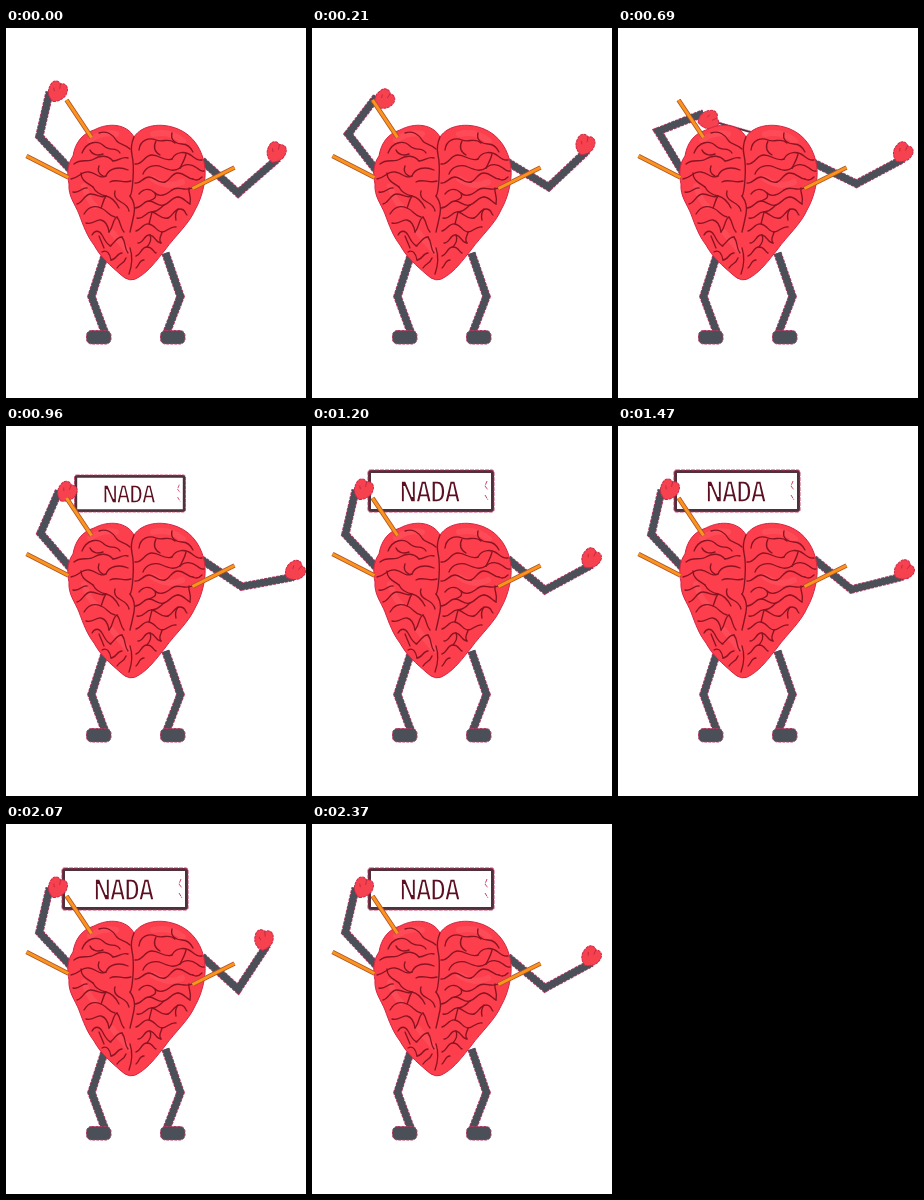
These frames come from a looping animation (300 px wide and 370 px high, 2400 ms). An HTML page:

```html
<!DOCTYPE html>
<html lang="es">
<head>
<meta charset="utf-8">
<title>Nada</title>
<style>
html, body { margin: 0; width: 100%; height: 100%; overflow: hidden; background: #fff; }
svg { display: block; width: 300px; height: 370px; }
path { fill: none; stroke-linecap: butt; stroke-linejoin: miter; }
.edge { stroke: #c43a68; stroke-width: 8.4; stroke-dasharray: 3 1; }
.limb { stroke: #4b4f58; stroke-width: 7; }
.foot { fill: #4b4f58; stroke: #b03a60; stroke-width: 1; stroke-dasharray: 3 1; }
.fist { fill: #f6414f; stroke: #cf2848; stroke-width: 1; stroke-dasharray: 3 .7; }
.crease { stroke: #c4283f; stroke-width: .9; }
.brain { fill: #fc3e4d; stroke: #d22743; stroke-width: 1; stroke-linejoin: round; }
.shade { stroke: #ff5b66; stroke-width: 6; stroke-linecap: round; opacity: .45; }
.fold { stroke: #8a1422; stroke-width: 1.35; stroke-linecap: round; stroke-linejoin: round; }
.rim { stroke: #b0532a; stroke-width: 4.6; }
.stick { stroke: #fa941d; stroke-width: 3; }
.board { fill: #fff; stroke: #4d323e; stroke-width: 3; }
.trim { fill: none; stroke: #c62d58; stroke-width: .9; stroke-dasharray: 4 1; }
/* The white stroke thins the bold lettering */
text {
  font: 700 29px "Open Sans Condensed", "Open Sans", sans-serif;
  font-stretch: 75%; letter-spacing: -1.5px; text-anchor: middle;
  fill: #5c0f20; stroke: #fff; stroke-width: 1.7;
}
</style>
</head>
<body>
<svg viewBox="0 0 300 370">
  <g id="sign">
    <rect class="board" x="-61.5" y="-19.5" width="123" height="39" rx="1.5"/>
    <rect class="trim" x="-63" y="-21" width="126" height="42" rx="2"/>
    <path class="trim" d="M56 -10l-2 5 3 4M54 4l3 5"/>
    <text x="-2" y="11">NADA</text>
  </g>
  <g id="legs"></g>
  <g id="arms"></g>
  <g id="body"></g>
  <g id="sticks"></g>
</svg>
<script>
const LOOP = 2400, STEP = 30;
const get = id => document.getElementById(id);

function add(parent, tag, attrs) {
  const el = document.createElementNS("http://www.w3.org/2000/svg", tag);
  for (const name in attrs) el.setAttribute(name, attrs[name]);
  return parent.appendChild(el);
}
const line = (parent, cls, d) => add(parent, "path", { class: cls, d });

// Legs
for (const [d, footX] of [
  ["M99.500 225L85.500 268.500L99 305", 80.500],
  ["M159.500 225L174.500 268.500L160.500 305", 154.500]
]) {
  const legs = get("legs");
  line(legs, "edge", d);
  line(legs, "limb", d);
  add(legs, "rect", { class: "foot", x: footX, y: 302.5, width: 24.5, height: 13.5, rx: 5 });
}

// Heart-shaped brain
const body = get("body");
line(body, "brain", `M128 109C121 96 103 94 88 102C75 106 69 116 67 128
  C61 136 61 147 63 156C62 168 69 176 73 186C77 197 81 208 88 217
  C95 230 105 238 114 246Q124 256 133 249C143 243 151 232 159 222
  C169 208 183 196 189 182C197 168 200 151 199 140C197 122 187 107 172 101
  C155 94 136 97 128 109Z`);

const shades = ["M84 112q13-9 26-6", "M147 106q17-4 30 7", "M78 158q5 16 11 20", "M147 151q15 10 29 3", "M106 204q9 12 17 20"];
shades.forEach(d => line(body, "shade", d));

const cleft = ["M128 109q-4 9-2 18t1 24t-3 17", "M124 168q6 8 4 18t-4 18", "M124 220q4 12-1 26"];
const leftTop = [
  "M76 125c5-12 16-13 22-7s12 0 16 7", "M93 105c8-3 14 2 17 7s9 4 14 9", "M68 136c7-6 14-1 20-5s14-4 19 2",
  "M84 122c2 5 8 6 13 4", "M107 133c6 0 9-5 15-3", "M65 151c8-1 10-8 18-7s9 7 17 4", "M100 148c3-8 13-10 22-6",
  "M75 145c0 8 7 10 12 14", "M93 138c-2 5 0 8 4 10", "M104 154c7-4 13 2 21-1", "M67 164c6 2 9-5 14-4"
];
const rightTop = [
  "M133 122c1-10 10-13 17-10s13-3 19 3", "M166 105c-2 7 4 11 10 11s9 4 11 8", "M129 136c8 1 9-9 17-9s12 7 20 4",
  "M166 131c4-8 14-8 20-3s7 4 10 4", "M150 113c-3 6-1 11 4 14", "M137 146c3-8 12-10 19-7s12 5 18 1",
  "M174 140c5-5 12-4 17 0s5 3 7 3", "M129 155c6 1 8-6 14-6s9 7 16 5", "M159 154c5-1 6-9 13-9s9 6 15 6",
  "M180 126c-1 5-3 8-6 14", "M187 151c3 2 6 1 9-2"
];
const leftLow = [
  "M71 176c6-1 7-10 14-10s9 5 15 2", "M87 159c3 6 8 8 13 9s10 6 13 12", "M78 186c4-7 10-9 17-6s8 8 14 9",
  "M109 163c-2 6 2 9 6 11s7 4 8 9", "M80 195c7 2 10-4 15-3s7 6 8 12", "M86 207c3-5 7-5 10 0s4 9 9 11",
  "M103 204c5-6 3-12 8-15", "M111 189c4 5 3 11 7 15", "M104 218c5-3 6-9 12-9", "M116 209c4 5 2 11 6 16",
  "M96 224c5-3 8 2 9 8", "M105 232c5 0 6-7 11-7", "M111 240c3-5 7-4 9-10", "M95 180c2-4 2-8 5-12", "M93 208l5 12"
];
const rightLow = [
  "M133 166c5-6 11-6 16-1s12 1 17-3", "M166 162c6-5 12 2 20-2", "M129 180c7 0 8-7 14-7s9 6 15 4s8-8 14-8",
  "M149 165c2 5-1 6-6 8", "M172 169c5 0 8 5 12 7", "M131 190c7 2 9-7 15-6s9 8 16 6", "M162 190c5-2 6-9 12-9s5 5 7 6",
  "M158 177c-4 3-5 6-12 7", "M130 203c5-1 7-8 13-7s8 8 13 8s8-6 14-5", "M146 184l-3 12", "M132 215c6 0 6-9 12-8s5 8 11 8",
  "M156 204c-1 5-4 7-1 11", "M130 228c5-1 5-9 11-9s6 5 9 6", "M144 207c2 5 0 8-3 12", "M130 240c3-2 3-8 8-8",
  "M172 181c-3 4-3 7-2 11", "M183 160c-1 6 3 8 1 16"
];
for (const group of [cleft, leftTop, rightTop, leftLow, rightLow])
  group.forEach(d => line(body, "fold", d));

// Sticks
for (const d of ["M60.500 72L85.500 109.500", "M20.500 128L62.500 149.500", "M186.500 160.500L228.500 139.500"]) {
  line(get("sticks"), "rim", d);
  line(get("sticks"), "stick", d);
}

// Arms: bend turns the forearm away from the line to the fist
function makeArm(shoulder, bend, twist) {
  const g = add(get("arms"), "g");
  const arm = { shoulder, bend, twist, edge: line(g, "edge", ""), limb: line(g, "limb", "") };
  arm.fist = add(g, "g");
  line(arm.fist, "fist", "M-11 0C-9-7-3-10 3-9C9-9 11-3 8 0C11 4 8 9 3 9C-3 10-8 6-11 0Z");
  line(arm.fist, "crease", "M8 0l-5 1M2-5l-3 2");
  return arm;
}
const leftArm = makeArm([61, 138], -9, 0);
const rightArm = makeArm([202, 138], 6, -20);

const polar = ([x, y], r, deg) => {
  const a = deg * Math.PI / 180;
  return [x + r * Math.cos(a), y + r * Math.sin(a)];
};

function poseArm(arm, upper, fore, reach) {
  const root = polar(arm.shoulder, -8, upper);
  const elbow = polar(arm.shoulder, 40.5, upper);
  const wrist = polar(elbow, reach - 3, fore + arm.bend);
  const hand = polar(elbow, reach, fore);
  const d = `M${root}L${elbow}L${wrist}`;
  arm.edge.setAttribute("d", d);
  arm.limb.setAttribute("d", d);
  arm.fist.setAttribute("transform", `translate(${hand}) rotate(${fore + arm.twist})`);
}

function sample(keys, t) {
  const i = keys.findIndex(k => k[0] > t);
  if (i < 0) return keys[keys.length - 1].slice(1);
  const a = keys[i - 1], b = keys[i], k = (t - a[0]) / (b[0] - a[0]);
  return a.slice(1).map((v, j) => v + (b[j + 1] - v) * k);
}

// time, upper arm angle, forearm angle
const swing = [[0, 42, -47], [450, 19, -52], [540, 19, -46], [690, 26, -34], [960, 34, -16.5], [1110, 38.7, -16]];
// time, centre x, centre y, scale, angle
const lift = [[540, 128, 150, .4, 25], [690, 128, 115, .6, 16], [960, 124, 67.5, .88, 0], [1080, 119, 65, 1, 0]];

function draw(t) {
  // Left arm dips behind the brain and comes back with the sign
  const p = Math.max(0, 1 - Math.abs(t - 540) / 540);
  const dip = .7 * (1 - Math.cos(Math.PI * p)) / 2 + .3 * p;
  poseArm(leftArm, -133 + 15 * dip, -68 + 70 * dip, 48.5 + 4.5 * dip);

  // Right arm swings out, then waves
  const wave = Math.cos(2 * Math.PI * (t - 1117) / 390);
  const [upper, fore] = t < 1110 ? sample(swing, t) : [40.5 - 1.8 * wave, -40 + 24 * wave];
  poseArm(rightArm, upper, fore, 56);

  const shown = t > 540;
  get("sign").style.display = shown ? "" : "none";
  if (shown) {
    const [x, y, s, a] = sample(lift, t);
    get("sign").setAttribute("transform", `translate(${x} ${y}) rotate(${a}) scale(${s})`);
  }
}

const start = performance.now();
function tick() {
  const t = (performance.now() - start) % LOOP;
  draw(Math.floor(t / STEP) * STEP);
  requestAnimationFrame(tick);
}
tick();
</script>
</body>
</html>
```
